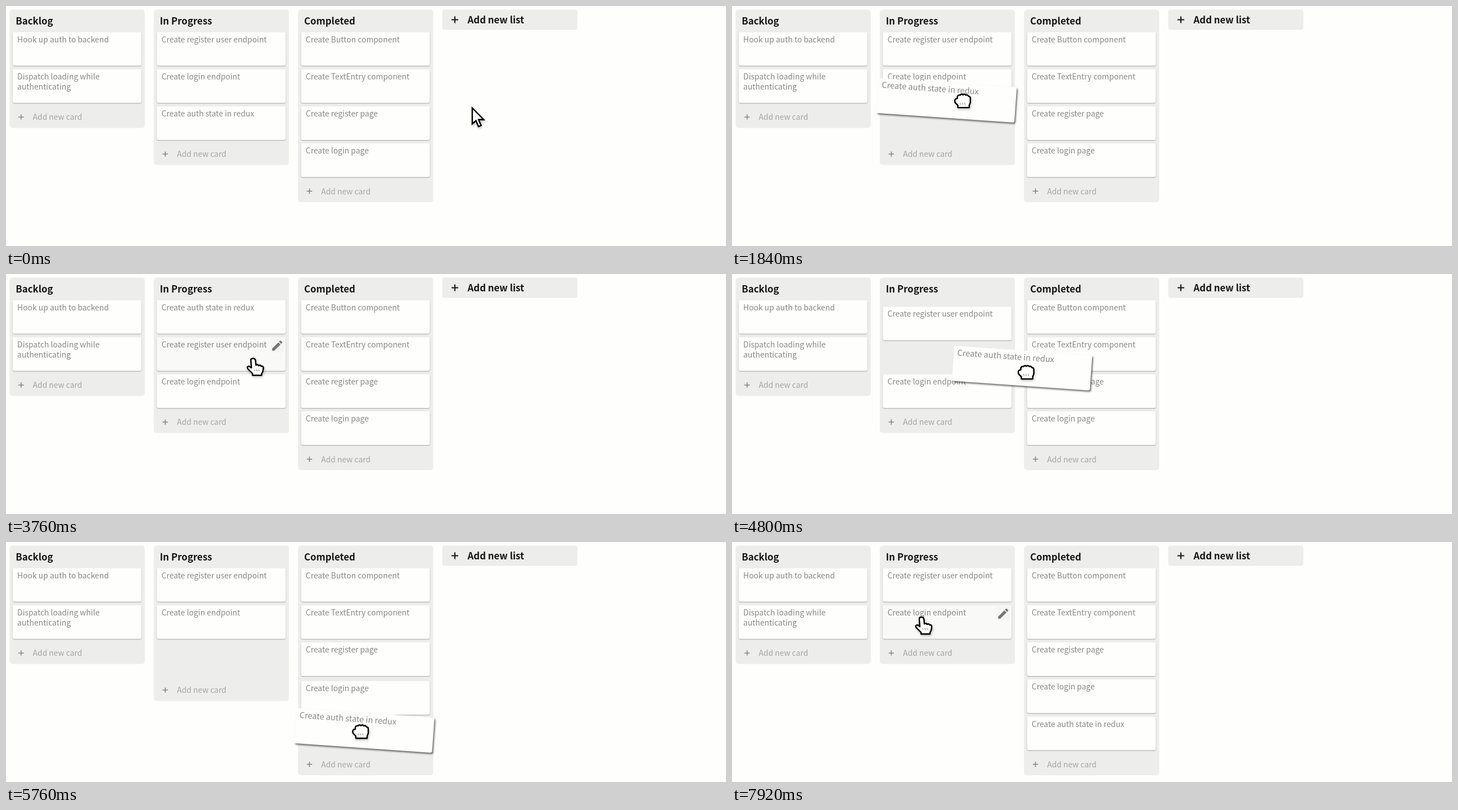
Animation, 1280 px wide and 428 px high, one loop 8 s. Source, as an HTML page with a canvas:

```html
<!DOCTYPE html>
<html lang="en">
<head>
<meta charset="utf-8">
<title>Task board</title>
<style>
  html, body { margin: 0; width: 100%; height: 100%; overflow: hidden; background: #fefefd; }
  canvas { display: block; }
</style>
</head>
<body>
<canvas id="stage" width="1280" height="428"></canvas>
<script>
const ctx = document.getElementById('stage').getContext('2d');
const LOOP = 8000, CARD_W = 229, CARD_H = 60, GROWTH = 1.048, TILT = 4 * Math.PI / 180;
const FAMILY = '"Noto Sans CJK JP", "Noto Sans CJK SC", "Noto Sans CJK", "Open Sans", sans-serif';
const BODY = `400 13.88px ${FAMILY}`, TITLE = `700 16.85px ${FAMILY}`;
const PAPER = '#fefefd', PANEL = '#ededeb', INK = '#151515';

const columnX = index => 6.4 + index * 256.35;
const slotY = slot => 46.5 + slot * 66.2;
const slotCenter = (col, slot) => [columnX(col) + 5.4 + CARD_W / 2, slotY(slot) + CARD_H / 2];

const mix = (a, b, p) => a + (b - a) * p;
const progress = (t, start, end) => Math.max(0, Math.min(1, (t - start) / (end - start)));
const smooth = p => p * p * (3 - 2 * p);
const slide = (t, start) => 1 - (1 - progress(t, start, start + 250)) ** 3;

// Each move eases from wherever the last one ended: start, end, x, y.
function follow(t, origin, moves) {
  return moves.reduce(([x, y], [start, end, toX, toY]) => {
    const p = smooth(progress(t, start, end));
    return [mix(x, toX, p), mix(y, toY, p)];
  }, origin);
}

const HOLDS = [{ grab: 1400, release: 2960, settled: 3200 }, { grab: 4480, release: 7040, settled: 7400 }];
const CARD_MOVES = [
  [1400, 2640, 378, 68],
  [2960, 3200, ...slotCenter(1, 0)],
  [4480, 5110, 641, 254],
  [5110, 5760, 636.8, 336],
  [6240, 6880, 659, 319.5],
  [7040, 7400, ...slotCenter(2, 4)]
];
const CURSOR_MOVES = [
  [560, 1360, 414, 205],
  [1400, 2640, 406, 51.5],
  [3120, 3520, 460, 180],
  [3520, 4240, 381, 71],
  [4480, 5110, 660, 257],
  [5110, 5760, 632, 329.5],
  [6240, 6880, 654, 313],
  [7400, 7760, 390, 225],
  [7760, 7920, 337, 135]
];

function text(value, x, y, font, color) {
  ctx.font = font;
  ctx.fillStyle = color;
  ctx.fillText(value, x, y);
}

function box(x, y, w, h, r, color) {
  ctx.fillStyle = color;
  ctx.beginPath();
  ctx.roundRect(x, y, w, h, r);
  ctx.fill();
}

function shadow(alpha, blur, x, y) {
  ctx.shadowColor = `rgba(0,0,0,${alpha})`;
  ctx.shadowBlur = blur;
  ctx.shadowOffsetX = x;
  ctx.shadowOffsetY = y;
}

function plus(x, y, radius, width, color) {
  ctx.strokeStyle = color;
  ctx.lineWidth = width;
  ctx.beginPath();
  ctx.moveTo(x - radius, y);
  ctx.lineTo(x + radius, y);
  ctx.moveTo(x, y - radius);
  ctx.lineTo(x, y + radius);
  ctx.stroke();
}

function column(index, title, count) {
  const x = columnX(index), bottom = slotY(count) + 38.5;
  box(x, 6.5, 240.3, bottom - 6.5, 5, PANEL);
  text(title, x + 10.8, 32.5, TITLE, INK);
  plus(x + 20.4, bottom - 19.5, 4.7, 1.5, '#828282');
  text('Add new card', x + 41.2, bottom - 14.3, BODY, '#a6a6a4');
  return { x, y: bottom - 38, w: 240, h: 36 };
}

const PENCIL = new Path2D('M3 17.25V21h3.75L17.81 9.94l-3.75-3.75L3 17.25z' +
  'M20.71 7.04a1 1 0 0 0 0-1.41l-2.34-2.34a1 1 0 0 0-1.41 0l-1.83 1.83 3.75 3.75 1.83-1.83z');

function makeCard([x, y], ...lines) {
  return { x: x - CARD_W / 2, y: y - CARD_H / 2, w: CARD_W, h: CARD_H, lines };
}

function drawCard({ x, y, lines }, hovered, lift = 0) {
  const scale = mix(1, GROWTH, lift), w = mix(CARD_W, 246, lift), h = CARD_H * scale;
  ctx.save();
  ctx.translate(x + CARD_W / 2, y + CARD_H / 2);
  ctx.rotate(TILT * lift);
  ctx.save();
  shadow(mix(.3, .55, lift), mix(1.6, 3, lift), 2 * lift, mix(1, 2.5, lift));
  box(-w / 2, -h / 2, w, h, 3, hovered ? '#f9f9f8' : PAPER);
  ctx.restore();
  if (hovered) {
    ctx.save();
    ctx.translate(w / 2 - 27, 3 - h / 2);
    box(0, 0, 24, 24, 2, '#f4f4f3');
    ctx.fillStyle = '#757575';
    ctx.fill(PENCIL);
    ctx.restore();
  }
  ctx.translate(mix(-106.2, -116.5, lift), mix(-11.7, -14.2, lift));
  ctx.scale(scale, scale);
  lines.forEach((line, i) => text(line, 0, i * 18.3, BODY, '#888886'));
  ctx.restore();
}

const MARKS = 'v3h2m2-3v3h2m2-3v3h2';
const CURSORS = {
  arrow: { shift: [1, 2], outline: 'M0 0V28L6.5 22.5 11 33 15.5 31 11 20.5H20Z' },
  pointer: {
    shift: [0, 0],
    outline: 'M-4 2Q-4-1 0-1Q3-1 4 2L5 11Q8 9 10 12Q13 10 14 13Q17 12 18 15Q18 23 15 26V29H-1V26L-9 18Q-12 14-8 13Q-6 13-3 16Z',
    marks: 'M2 18' + MARKS
  },
  fist: {
    shift: [-2, 8.5],
    outline: 'M-9-4V-7Q-8-11-4-10Q-2-13 1-10.5Q4-13 6-10Q9-11.5 11-8Q14-8 14-4V3L12 8V12H-8V8L-13 3Q-15-4-9-4Z',
    marks: 'M-4 3' + MARKS
  }
};

function drawCursor({ shift, outline, marks }, x, y) {
  const shape = new Path2D(outline);
  ctx.save();
  ctx.translate(x + shift[0], y + shift[1]);
  ctx.lineWidth = 2.3;
  ctx.lineJoin = marks ? 'round' : 'miter';
  ctx.strokeStyle = '#000';
  ctx.fillStyle = '#fff';
  ctx.save();
  shadow(.35, 4, 1, 2);
  ctx.stroke(shape);
  ctx.restore();
  ctx.fill(shape);
  ctx.stroke(shape);
  if (marks) {
    ctx.lineWidth = 1;
    ctx.strokeStyle = '#999';
    ctx.stroke(new Path2D(marks));
  }
  ctx.restore();
}

function draw(t) {
  ctx.fillStyle = PAPER;
  ctx.fillRect(0, 0, 1280, 428);

  const joined = slide(t, 4960);
  const buttons = [
    column(0, 'Backlog', 2),
    column(1, 'In Progress', 3 - slide(t, 7400)),
    column(2, 'Completed', 4 + joined)
  ];
  box(columnX(3), 6.5, 240.3, 36, 4, PANEL);
  plus(798, 24.5, 6, 2, INK);
  text('Add new list', 820.5, 30.5, TITLE, INK);

  const place = (col, slot, ...lines) => makeCard(slotCenter(col, slot), ...lines);
  const moving = makeCard(follow(t, slotCenter(1, 2), CARD_MOVES), 'Create auth state in redux');
  const cards = [
    place(0, 0, 'Hook up auth to backend'),
    place(0, 1, 'Dispatch loading while', 'authenticating'),
    place(1, slide(t, 2200) - slide(t, 4691), 'Create register user endpoint'),
    place(1, 1 + slide(t, 1900) - slide(t, 4840), 'Create login endpoint'),
    place(2, 0, 'Create Button component'),
    place(2, 1, 'Create TextEntry component'),
    place(2, 2, 'Create register page'),
    place(2, 3 + joined - slide(t, 5600), 'Create login page'),
    moving
  ];

  const hold = HOLDS.find(({ grab, settled }) => t >= grab && t < settled);
  const lift = hold ? progress(t, hold.grab, hold.grab + 160) - smooth(progress(t, hold.release, hold.settled)) : 0;
  const [x, y] = follow(t, [828, 180], CURSOR_MOVES);
  const under = r => !hold && x >= r.x && x <= r.x + r.w && y >= r.y && y <= r.y + r.h;
  const hovered = cards.find(under);
  cards.forEach(card => drawCard(card, card === hovered, card === moving ? lift : 0));

  const dragging = hold && t < hold.release;
  const clickable = hovered || buttons.some(under);
  drawCursor(CURSORS[dragging ? 'fist' : clickable ? 'pointer' : 'arrow'], x, y);
}

const started = performance.now();
function frame() {
  draw((performance.now() - started) % LOOP);
  requestAnimationFrame(frame);
}
frame();
</script>
</body>
</html>
```
